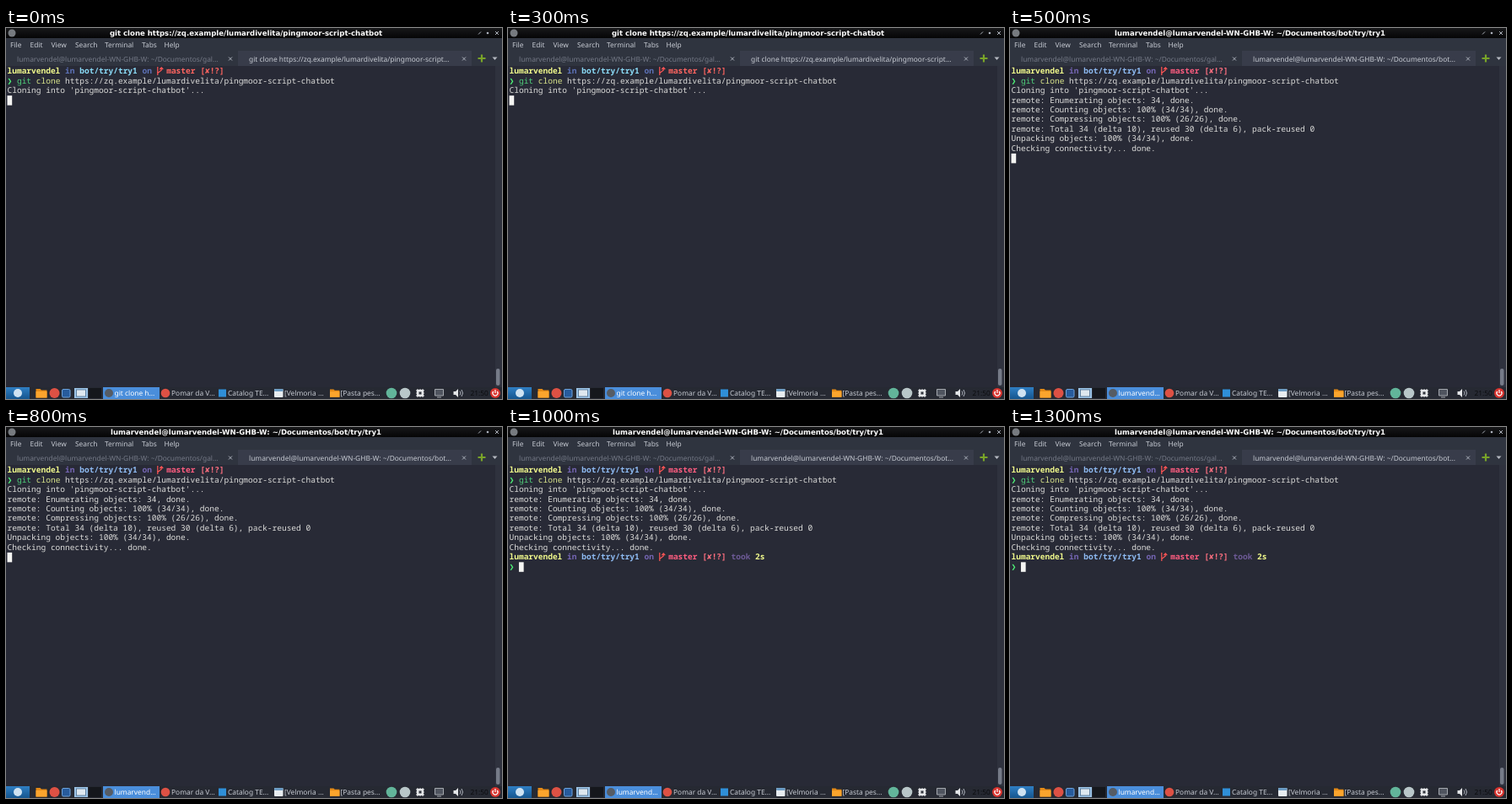
Write an HTML page that moves like this. It is 588 by 440 pixels and loops after 1.5 s.

```html
<!DOCTYPE html>
<html lang="en">
<head>
<meta charset="utf-8">
<title>Terminal clone</title>
<style>
  html, body { margin: 0; width: 100%; height: 100%; overflow: hidden; background: #282a36; }
  svg { display: block; width: 588px; height: 440px; }
  text { font: 8.4px "Noto Sans", "Open Sans", sans-serif; fill: #c6cad2; white-space: pre; text-rendering: geometricPrecision; }
  .title { font: bold 8.55px "DejaVu Sans", sans-serif; fill: #fff; text-anchor: middle; }
  .dim { fill: #747986; }
  .term text { font: 9.53px "Noto Sans Mono", "DejaVu Sans Mono", monospace; fill: #dcdcda; }
  .term .bold { font-weight: bold; }
  .line { fill: none; stroke: #aeb3bd; stroke-width: 1; }
</style>
</head>
<body>
<svg viewBox="0 0 588 440">
  <defs>
    <linearGradient id="start" x2="0" y2="1">
      <stop stop-color="#2f7fc4"/><stop offset="1" stop-color="#15568f"/>
    </linearGradient>
    <linearGradient id="bar" x2="0" y2="1">
      <stop stop-color="#17181a"/><stop offset="1" stop-color="#050506"/>
    </linearGradient>
    <g id="folder">
      <path d="M0 0h5l1.500 1.500h6.500v9h-13z" fill="#e58a16"/>
      <path d="M0 3h13v7.500h-13z" fill="#fba52d"/>
    </g>
    <path id="close" class="line" d="M-2-2l4 4m0-4l-4 4"/>
  </defs>

  <rect width="588" height="440" fill="#282a36"/>

  <!-- title bar -->
  <rect width="588" height="12" fill="url(#bar)"/>
  <circle cx="7" cy="6" r="4.500" fill="#777b80"/>
  <path class="line" d="M560 7.500l3-3M580 4l4 4m0-4l-4 4"/>
  <circle cx="571" cy="6" r="1.300" fill="#aeb3bd"/>

  <!-- menu and tabs -->
  <rect y="12" width="588" height="33" fill="#2f343f"/>
  <rect x="275" y="27" width="277" height="18" fill="#383c4a"/>
  <g id="menu"></g>
  <use href="#close" x="266" y="36.500"/>
  <use href="#close" x="543" y="36.500"/>
  <path d="M559.500 36h9m-4.500-4.500v9" stroke="#79a428" stroke-width="2.200"/>
  <path d="M576.500 34.500h6l-3 3.500z" fill="#b4b8c0"/>

  <g id="screen" class="term"></g>
  <rect id="cursor" width="5.700" height="11.500" fill="#f4f4f2"/>
  <rect x="580" y="45" width="8" height="381" fill="#2f323e"/>
  <rect x="581" y="404" width="4.500" height="20" rx="2" fill="#767b88"/>

  <!-- taskbar -->
  <rect y="426" width="588" height="14" fill="#262932"/>
  <rect y="426" width="28" height="14" fill="url(#start)"/>
  <circle cx="14" cy="433" r="5" fill="#cfe3f2"/>
  <use href="#folder" x="35.500" y="428"/>
  <circle cx="57.500" cy="433" r="6" fill="#dd5144"/>
  <rect x="66.500" y="428.500" width="9.500" height="9.500" rx="1.500" fill="#275b9c" stroke="#6ea3dc"/>
  <rect x="81" y="427" width="16" height="12" fill="#9cc3e6"/>
  <rect x="83.500" y="429" width="11" height="8" fill="#dfe8ef" stroke="#4c6f92" stroke-width=".8"/>
  <rect x="98" y="427" width="15" height="12" fill="#15171c"/>
  <rect x="115" y="426" width="67" height="14" fill="#4a8edb"/>
  <circle cx="122" cy="433" r="5" fill="#565c64"/>
  <circle cx="189" cy="433" r="5.300" fill="#dd5144"/>
  <rect x="252" y="428.500" width="9" height="9" fill="#2f8fd8"/>
  <rect x="318" y="428" width="10.500" height="10" rx="1" fill="#e8edf0"/>
  <rect x="318" y="428" width="10.500" height="3" rx="1" fill="#6c9cc4"/>
  <use href="#folder" transform="translate(384 428.500) scale(.88)"/>

  <!-- tray -->
  <circle cx="457" cy="433" r="6.300" fill="#62b59a"/>
  <circle cx="473" cy="433" r="6.300" fill="#b9c7c9"/>
  <path d="M486 430h10m-10 3h10m-10 3h10M488 428v10m3-10v10m3-10v10" stroke="#e4e6e8"/>
  <rect x="487" y="429" width="8" height="8" rx="1" fill="#e4e6e8"/>
  <rect x="489.500" y="431.500" width="3" height="3" fill="#30343c"/>
  <path d="M508.500 428.500h10v7.500h-10zM511 438h5" fill="#50555f" stroke="#a4a8ae"/>
  <path d="M530.500 431h2.500l3-3v10l-3-3h-2.500z" fill="#e4e6e8"/>
  <path class="line" d="M538 430.500q2 2.500 0 5m2-6.500q3 4 0 8"/>
  <circle cx="580" cy="433" r="6" fill="#d8342f"/>
  <path d="M577.800 431a3 3 0 1 0 4.400 0M580 429v4" fill="none" stroke="#fff" stroke-width="1.200"/>
  <g id="labels"></g>
</svg>
<script>
const $ = id => document.getElementById(id);
const user = "lumarvendel", host = `${user}@${user}-WN-GHB-W: ~/Documentos/`;
const repo = "pingmoor-script-chatbot";
const address = `https://zq.example/lumardivelita/${repo}`;
const CELL = 5.718, ROW = 11.45, LEFT = 1.5;

const text = (x, y, s, attrs = "") => `<text x="${x}" y="${y}" ${attrs}>${s}</text>`;
const cell = (col, row, s, color = "#dcdcda", bold = false) =>
  text(LEFT + col * CELL, 54.2 + row * ROW, s, `style="fill:${color}" class="${bold ? "bold" : ""}"`);

function prompt(row, c) {
  const y = 46 + row * ROW;
  return cell(0, row, user, "#f1fa8c", true) + cell(12, row, "in", c.word, true) +
    cell(15, row, "bot/try/try1", c.path, true) + cell(28, row, "on", c.word, true) +
    `<path d="M179.800 ${y}v10m0-2.500l4.500-3.500v-3m-2 2l2-2.200 2 2.200" fill="none" stroke="#ff5555" stroke-width="1.200"/>` +
    cell(33, row, "master", c.branch, true) + cell(40, row, "[", c.status, true) +
    cell(41, row, "✘", c.status, true) + cell(42, row, "!?]", c.status, true);
}

const output = [
  "remote: Enumerating objects: 34, done.",
  "remote: Counting objects: 100% (34/34), done.",
  "remote: Compressing objects: 100% (26/26), done.",
  "remote: Total 34 (delta 10), reused 30 (delta 6), pack-reused 0",
  "Unpacking objects: 100% (34/34), done.",
  "Checking connectivity... done."
];
const warm = { word: "#5d72b8", path: "#8bdcf8", branch: "#ff6560", status: "#ff6560" };
const cool = { word: "#7566b4", path: "#8fbcf4", branch: "#ff5d80", status: "#ff7080" };

function screen(step) {
  const colors = step ? cool : warm;
  let out = prompt(0, colors) + cell(0, 1, "❯", "#50fa7b", true) + cell(2, 1, "git", "#50d07b") +
    cell(6, 1, "clone", "#dbe68c") + cell(12, 1, address) + cell(0, 2, `Cloning into '${repo}'...`);
  if (step > 0) out += output.map((s, i) => cell(0, i + 3, s)).join("");
  if (step > 1) out += prompt(9, colors) + cell(46, 9, "took", "#6e5b98", true) +
    cell(51, 9, "2s", "#f1fa8c", true) + cell(0, 10, "❯", "#50fa7b", true);
  return out;
}

function labels(step) {
  const command = "git clone " + address;
  const title = step ? host + "bot/try/try1" : command;
  const tab = step ? host + "bot..." : command.replace("-chatbot", "...");
  const task = step ? user.slice(0, 9) + "..." : "git clone h...";
  return text(284.5, 9, title, 'class="title"') + text(288, 39.5, tab) +
    text(128.5, 436, task, 'style="fill:#fff"') +
    text(196, 436, "Pomar da V...") + text(263, 436, "Catalog TE...") +
    text(330, 436, "[Velmoria ...") + text(396.5, 436, "[Pasta pes...") +
    text(550.5, 436, "21:50", 'style="fill:#0b0c0f"');
}

$("menu").innerHTML = [["File", 5], ["Edit", 28.5], ["View", 53.5], ["Search", 82],
  ["Terminal", 117], ["Tabs", 161], ["Help", 187.5]].map(([s, x]) => text(x, 22.5, s)).join("") +
  text(13, 39.5, host + "gal...", 'class="dim"');

const cursors = [[0, 3], [0, 9], [2, 10]];
let shown = -1;
function draw() {
  const step = Math.floor(performance.now() % 1500 / 500);
  if (step !== shown) {
    shown = step;
    const [col, row] = cursors[step];
    $("screen").innerHTML = screen(step);
    $("labels").innerHTML = labels(step);
    $("cursor").setAttribute("x", LEFT + col * CELL);
    $("cursor").setAttribute("y", 45.8 + row * ROW);
  }
  requestAnimationFrame(draw);
}
draw();
</script>
</body>
</html>
```
